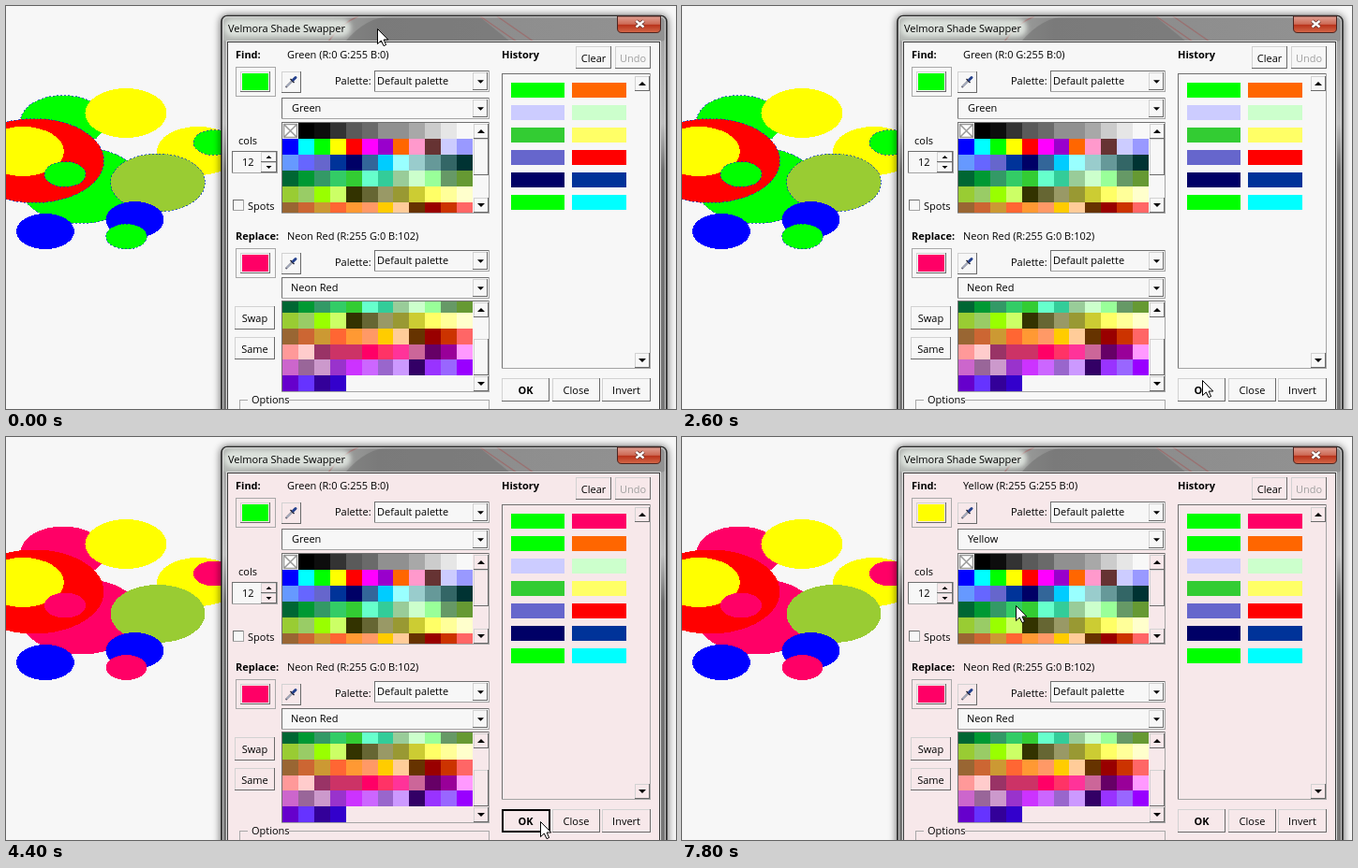
These frames come from a looping animation (715x431 px, 8 s). An HTML page:

```html
<!DOCTYPE html>
<html lang="en">
<head>
<meta charset="utf-8">
<title>Color replacer dialog</title>
<style>
html, body { margin: 0; width: 100%; height: 100%; overflow: hidden; background: #f7f7f7; }
svg { display: block; width: 715px; height: 431px; --bg: #f7f7f7; --mark: #0f0; }
text { font: 11px "Open Sans", "Noto Sans", sans-serif; white-space: pre; }
.b { font-weight: 700; }
.mid { text-anchor: middle; }
rect, ellipse { shape-rendering: crispEdges; }
.soft rect { shape-rendering: auto; }
</style>
</head>
<body>
<svg id="stage" viewBox="0 0 715 431" xmlns="http://www.w3.org/2000/svg">
  <defs>
    <filter id="blur" x="-20%" y="-80%" width="140%" height="260%"><feGaussianBlur stdDeviation="2.5"/></filter>
    <filter id="shade" x="-10%" y="-10%" width="120%" height="120%"><feGaussianBlur stdDeviation="4"/></filter>
    <linearGradient id="bar">
      <stop offset="0" stop-color="#b4b8b4"/><stop offset=".25" stop-color="#a0a2a0"/>
      <stop offset=".35" stop-color="#8a8a8a"/><stop offset="1" stop-color="#929292"/>
    </linearGradient>
    <linearGradient id="close" x2="0" y2="1">
      <stop offset="0" stop-color="#e0a094"/><stop offset=".48" stop-color="#cd6a55"/>
      <stop offset=".52" stop-color="#b8321a"/><stop offset="1" stop-color="#d4694a"/>
    </linearGradient>
    <linearGradient id="side" x2="0" y2="1">
      <stop offset="0" stop-color="#a0a0a0"/><stop offset=".25" stop-color="#c0c0c0"/>
      <stop offset=".36" stop-color="#707070"/><stop offset="1" stop-color="#787878"/>
    </linearGradient>
    <clipPath id="barClip"><rect x="231" y="11" width="473" height="27"/></clipPath>
    <clipPath id="list0"><rect x="295" y="125" width="204" height="96"/></clipPath>
    <clipPath id="list1"><rect x="295" y="316" width="204" height="96"/></clipPath>
  </defs>
  <g id="art"></g>
  <g id="frame" class="soft"></g>
  <g id="panel"></g>
  <g id="pointer">
    <path d="M.5 .5V16.6L4.3 13L7 18.6L9.6 17.5L7.1 12H11.8Z" fill="#fff" stroke="#000"/>
    <g id="click" class="soft" transform="translate(-18 -18)">
      <rect x=".5" y=".5" width="15" height="15" rx="1.5" fill="#fff" stroke="#999"/>
      <rect x="4" y="3" width="8" height="10.5" rx="3.5" fill="#fff" stroke="#000" stroke-width="1.4"/>
      <path d="M4 8V6.5Q4 3 8 3V8Z"/><path d="M4 8H12" stroke="#000"/>
    </g>
  </g>
</svg>
<script>
const LOOP = 8000;
const $ = id => document.getElementById(id);

function add(parent, tag, attrs, text) {
  const el = document.createElementNS('http://www.w3.org/2000/svg', tag);
  for (const k in attrs) el.setAttribute(k, attrs[k]);
  if (text !== undefined) el.textContent = text;
  parent.appendChild(el);
  return el;
}

// Left picture
const art = $('art');
const fringes = [];
const oval = (cx, cy, rx, ry, fill) => add(art, 'ellipse', { cx, cy, rx, ry, fill });
function fringed(cx, cy, rx, ry, fill) {
  oval(cx, cy, rx, ry, fill);
  fringes.push(add(art, 'ellipse', { cx, cy, rx, ry, fill: 'none', stroke: '#0030c0',
    'stroke-width': .7, 'stroke-dasharray': '2 2' }));
}
const marked = (cx, cy, rx, ry) => fringed(cx, cy, rx, ry, 'var(--mark)');

marked(61, 123.5, 45.5, 28);
marked(80, 192, 65, 40.5);
fringed(30, 165.5, 74.5, 45, '#f00');
oval(18, 155.5, 44, 26.5, '#ff0');
oval(128, 114.5, 43.5, 26.5, '#ff0');
oval(205, 155, 44, 26, '#ff0');
marked(222, 146, 22, 13.5);
marked(63, 180, 22, 13.5);
fringed(162, 189, 50.5, 31, '#9c3');
oval(42, 241, 31, 19, '#00f');
oval(137.5, 228.5, 31, 19.5, '#00f');
marked(128.5, 246.5, 22, 13.5);

// Window frame
const frame = $('frame');
const shape = (tag, attrs) => add(frame, tag, attrs);
shape('rect', { x: 229, y: 10, width: 477, height: 470, rx: 7, fill: '#000', opacity: .62, filter: 'url(#shade)' });
shape('rect', { x: 230, y: 10.5, width: 475, height: 460, rx: 6, fill: 'url(#side)', stroke: '#2c2c2c', 'stroke-width': 1.6 });
const bar = add(frame, 'g', { 'clip-path': 'url(#barClip)' });
add(bar, 'rect', { x: 231, y: 11, width: 473, height: 27, rx: 5, fill: 'url(#bar)' });
add(bar, 'path', { d: 'M362 38Q385 11 412 11H505L538 38Z', fill: '#6c6c6c', opacity: .5 });
add(bar, 'path', { d: 'M344 38Q358 18 376 11M506 11L545 38M524 11L563 38', fill: 'none', stroke: '#a06060', 'stroke-width': 1.5, opacity: .6 });
add(bar, 'rect', { x: 233, y: 14, width: 135, height: 19, rx: 9, fill: '#e4eae4', opacity: .85, filter: 'url(#blur)' });
shape('rect', { x: 231.5, y: 11.8, width: 472, height: 460, rx: 5, fill: 'none', stroke: '#e4e4e4', opacity: .75 });
shape('path', { d: 'M652.5 11V24Q652.5 28.5 657 28.5H694Q698.5 28.5 698.5 24V11Z', fill: 'url(#close)', stroke: '#4a2420' });
const cross = 'M672.5 16L680.5 22.5M680.5 16L672.5 22.5';
shape('path', { d: cross, stroke: '#5a2a24', 'stroke-width': 4 });
shape('path', { d: cross, stroke: '#fff', 'stroke-width': 2.4 });

// Dialog controls
const panel = $('panel');
const fillBox = (x, y, w, h, fill, parent = panel) =>
  add(parent, 'rect', { x, y, width: w, height: h, fill });
const label = (x, y, s, cls = '', fill = '#000') =>
  add(panel, 'text', { x, y, class: cls, fill }, s);
const line = (d, stroke) => add(panel, 'path', { d, stroke, fill: 'none', 'shape-rendering': 'crispEdges' });

function bevel(x, y, w, h, fill, lit, dark) {
  fillBox(x, y, w, h, fill);
  line(`M${x + .5} ${y + h}V${y + .5}H${x + w}`, lit);
  line(`M${x} ${y + h - .5}H${x + w - .5}V${y}`, dark);
}
const raised = (x, y, w, h, fill = 'var(--bg)') => bevel(x, y, w, h, fill, '#d2d2d2', '#6a6a6a');
const sunken = (x, y, w, h, fill = 'var(--bg)') => bevel(x, y, w, h, fill, '#707070', '#a4a4a4');

function arrow(cx, cy, dir = 1, size = 4) {
  add(panel, 'path', { d: `M${cx - size} ${cy - dir * size / 2}h${size * 2}l${-size} ${dir * size}Z` });
}
function button(x, y, w, h, s, cls = '', fill) {
  raised(x, y, w, h);
  return label(x + w / 2, y + h / 2 + 4.5, s, 'mid ' + cls, fill);
}
function combo(x, y, w, s, tx) {
  sunken(x, y, w, 23, '#f7f7f7');
  raised(x + w - 18, y + 2, 16, 19, '#f7f7f7');
  arrow(x + w - 9.5, y + 12, 1, 3.5);
  return label(tx, y + 15, s);
}
function scroller(x, y, bottom, thumb) {
  raised(x, y, 16, 16);
  arrow(x + 8, y + 8, -1);
  if (thumb) raised(x, thumb, 16, 39);
  raised(x, bottom - 16, 16, 16);
  arrow(x + 8, bottom - 8);
}
function picker(y, fill) {
  line(`M245.5 ${y + .5}h42v31h-42Z`, '#a8a8a8');
  raised(250, y + 5, 32, 22);
  const chip = fillBox(252, y + 7, 28, 18, fill);
  raised(294, y + 5, 21, 23);
  add(panel, 'path', { d: `M298.5 ${y + 22}L305 ${y + 15.5}`, stroke: '#667', 'stroke-width': 2 });
  add(panel, 'path', { d: `M299.5 ${y + 21}L305 ${y + 15.5}`, stroke: '#dcecff' });
  add(panel, 'path', { d: `M303.5 ${y + 13}l4 4`, stroke: '#112', 'stroke-width': 1.3 });
  add(panel, 'path', { d: `M306.5 ${y + 14}L309 ${y + 11.5}`, stroke: '#24408c', 'stroke-width': 3, 'stroke-linecap': 'round' });
  label(351, y + 19, 'Palette:');
  return chip;
}

const COLORS = [
  'fff 000 0d0d0d 333 5a5a5a 6a6a6a 909090 909090 a8a8a8 ccc e6e6e6 f8f8f8',
  '00f 0ff 0f0 ff0 f00 f0f 90c f60 f9c 633 ccf 99f',
  '69f 66f 66c 039 006 369 0cf 9ff 9cc 699 366 033',
  '063 093 396 3c6 3c3 6fc 3c9 9c9 cfc 9f9 696 693',
  '9c3 9c6 9f0 cf6 330 663 996 993 cc3 ff6 ff9 ffc',
  '963 c63 c93 f63 f93 f96 fc0 fc9 630 900 c30 f66',
  'f99 fcc 936 c36 c36 f06 f36 f39 c69 606 909 f9f',
  'c6c 969 c9c 93c c3f c6f 96c c9f 306 93f 96f 90f',
  '60c 63f 309 30c'
].map(row => row.split(' '));
const CELL = 16.92;

function swatches(rows, top, clip) {
  const g = add(panel, 'g', { 'clip-path': `url(#${clip})` });
  const at = (from, i) => Math.round(from + i * CELL);
  return rows.map((row, r) => row.map((c, i) => {
    const x = at(295, i), y = at(top, r);
    return fillBox(x, y, at(295, i + 1) - x, at(top, r + 1) - y, '#' + c, g);
  }));
}

fillBox(235, 37, 464, 400, '#dcdcdc');
fillBox(236, 38, 462, 400, '#3a3a3a');
fillBox(237, 39, 460, 400, 'var(--bg)');
label(237, 27.5, 'Velmora Shade Swapper');

label(245, 56, 'Find:', 'b');
const findText = label(300, 56, '');
const findChip = picker(65, '#0f0');
combo(393, 69, 123, 'Default palette', 396);
const findName = combo(294, 98, 222, '', 305);
sunken(294, 124, 222, 98);
const topCells = swatches(COLORS.slice(0, 6), 125, 'list0');
add(panel, 'path', { d: 'M296.5 126.5h14v14h-14ZM297 127l13 13M310 127l-13 13', fill: 'none', stroke: '#999', 'stroke-width': 1.5 });
scroller(499, 126, 221, 142);

label(248, 148, 'cols');
sunken(241, 155, 49, 24, '#f7f7f7');
label(252, 171, '12');
raised(272, 156, 17, 11);
arrow(280.5, 161.5, -1, 3);
raised(272, 167, 17, 11);
arrow(280.5, 172.5, 1, 3);
sunken(242, 207, 12, 12, '#f7f7f7');
label(258, 218, 'Spots');

label(245, 250, 'Replace:', 'b');
label(300, 250, 'Neon Red (R:255 G:0 B:102)');
picker(259, '#f06');
combo(393, 261, 123, 'Default palette', 396);
combo(294, 290, 222, 'Neon Red', 304);
sunken(294, 315, 222, 98);
swatches(COLORS.slice(3), 310.8, 'list1');
scroller(499, 317, 412, 356);
button(244, 321, 43, 25, 'Swap');
button(244, 354, 43, 24, 'Same');
line('M249.5 431V421.5H258M302 421.5H515.5V431', '#a8a8a8');
label(262, 425, 'Options');

label(529, 56, 'History', 'b');
button(608, 43, 38, 24, 'Clear');
button(650, 43, 38, 24, 'Undo', '', '#a0a0a0');
sunken(529, 72, 159, 316);
scroller(671, 75, 387);
const history = add(panel, 'g', {});
[['0f0', 'f06'], ['0f0', 'f60'], ['ccf', 'cfc'], ['3c3', 'ff6'], ['66c', 'f00'], ['006', '039'], ['0f0', '0ff']]
  .forEach(([from, to], i) => {
    fillBox(539, 82 + i * 24, 57, 16, '#' + from, history);
    fillBox(604, 82 + i * 24, 58, 16, '#' + to, history);
  });
const newest = [...history.children].slice(0, 2);

button(529, 398, 51, 25, 'OK', 'b');
button(583, 398, 51, 25, 'Close');
button(636, 398, 52, 25, 'Invert');
const okRing = add(panel, 'path', { d: 'M530 399h50v23h-50Z', fill: 'none', stroke: '#000', 'stroke-width': 2, 'shape-rendering': 'crispEdges' });
const okFocus = add(panel, 'path', { d: 'M533.5 402.5h43v16h-43Z', fill: 'none', stroke: '#000', 'stroke-dasharray': '1 1', 'shape-rendering': 'crispEdges' });

// Pointer stops: time, x, y
const STOPS = [
  [0, 396, 24], [200, 384, 38], [400, 283, 73], [600, 274, 76], [1200, 233, 202],
  [1400, 257, 254], [1600, 257, 282], [2000, 275, 289], [2200, 430, 337],
  [2400, 507, 377], [2600, 555, 400], [2800, 570, 411], [6000, 543, 381],
  [6200, 481, 322], [6400, 412, 243], [6600, 357, 147], [7600, 356, 150], [7800, 356, 180]
];
const show = (el, on) => el.setAttribute('visibility', on ? 'visible' : 'hidden');
const within = (t, a, b) => t >= a && t < b;

function update(t) {
  const [, x, y] = STOPS.filter(s => s[0] <= t).pop();
  $('pointer').setAttribute('transform', `translate(${x} ${y})`);
  show($('click'), within(t, 3600, 4400) || within(t, 6800, 7400));

  const replaced = t >= 3800;
  $('stage').style.setProperty('--bg', replaced ? '#f7e8ea' : '#f7f7f7');
  $('stage').style.setProperty('--mark', replaced ? '#f06' : '#0f0');
  fringes.forEach(f => show(f, !replaced));
  newest.forEach(n => show(n, replaced));
  history.setAttribute('transform', `translate(0 ${replaced ? 0 : -24})`);

  show(okRing, within(t, 3600, 6800));
  show(okFocus, within(t, 3600, 4400));
  topCells[0][2].setAttribute('fill', within(t, 3600, 3800) ? '#600' : '#0d0d0d');

  const yellow = t >= 6800;
  findText.textContent = yellow ? 'Yellow (R:255 G:255 B:0)' : 'Green (R:0 G:255 B:0)';
  findName.textContent = yellow ? 'Yellow' : 'Green';
  findChip.setAttribute('fill', yellow ? '#ff0' : '#0f0');
}

const start = performance.now();
function tick() {
  update((performance.now() - start) % LOOP);
  requestAnimationFrame(tick);
}
tick();
</script>
</body>
</html>
```
